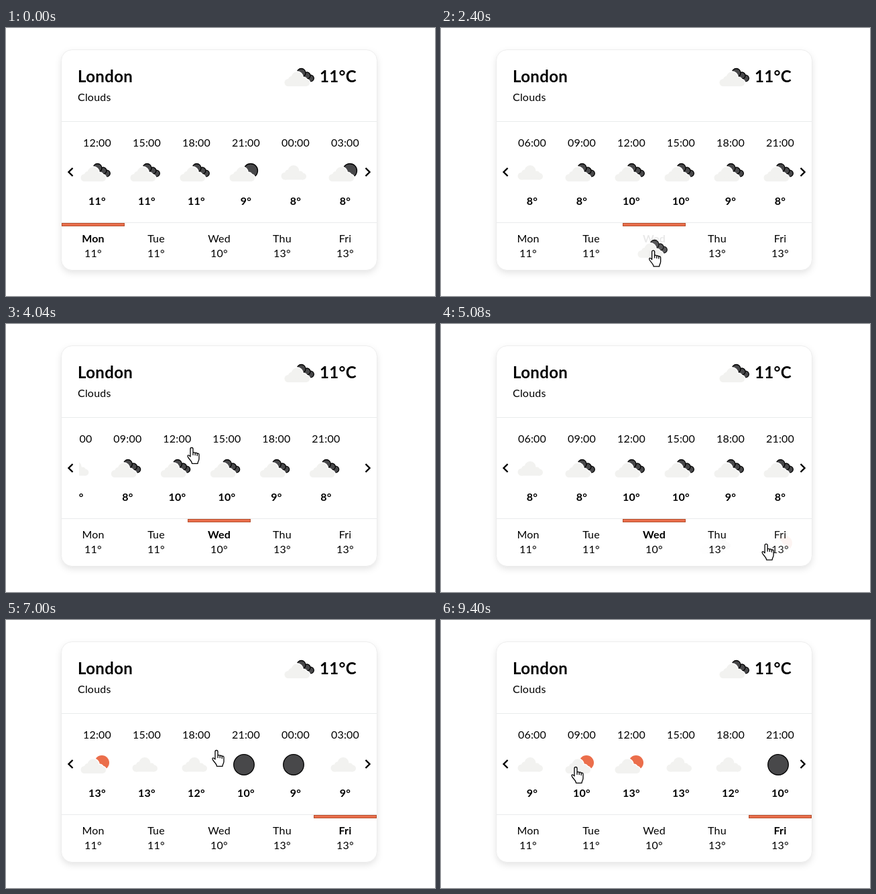
Write an HTML page that moves like this. It is 640 px wide and 400 px high and loops after 9.68 s.

```html
<!DOCTYPE html>
<html lang="en">
<head>
<meta charset="utf-8">
<title>Weather card</title>
<style>
  html, body { margin: 0; height: 100%; overflow: hidden; background: #fff; }
  svg { display: block; width: 640px; height: 400px; }
  text { font: 16px Lato, "Open Sans", sans-serif; letter-spacing: .2px; }
  .mid { text-anchor: middle; }
  .bold { font-weight: 700; }
  .big { font-size: 24px; font-weight: 700; letter-spacing: .35px; }
  .card { fill: #fff; stroke: #ededed; filter: drop-shadow(0 4px 5px rgba(0, 0, 0, .1)); }
  .rule { stroke: #e9ebec; }
  .arrow { fill: none; stroke: #000; stroke-width: 2.4; }
  .dark { fill: #48484a; stroke: #000; stroke-width: 1.3; }
</style>
</head>
<body>
<svg viewBox="0 0 640 400">
  <defs>
    <clipPath id="view"><rect x="109" y="145" width="418" height="140"/></clipPath>
    <clipPath id="inside"><rect x="83" y="33" width="470" height="328" rx="16"/></clipPath>
    <g id="puffs">
      <path d="M-19 6H8V14H-19z"/>
      <circle cx="-19" cy="8.500" r="5.500"/><circle cx="-14" cy="4" r="5"/><circle cx="-6" cy="1" r="8.500"/>
      <circle cx="4" cy="5.500" r="4.500"/><circle cx="8" cy="9" r="5"/>
    </g>
    <g id="front">
      <use href="#puffs" fill="#fff" stroke="#fff" stroke-width="3"/>
      <use href="#puffs" fill="#f2f2f0"/>
    </g>
    <g id="cloud"><use href="#puffs" x="3" y="-2.500" fill="#f2f2f0"/></g>
    <g id="clouds">
      <g class="dark">
        <circle cx="8" cy="3" r="4.500"/><circle cx="14.500" cy="2" r="4.800"/>
        <circle cx="9" cy="-2" r="5"/><circle cx=".5" cy="-6" r="6.500"/>
      </g>
      <use href="#front"/>
    </g>
    <g id="sun"><circle cx="7" cy="-2" r="11" fill="#eb6e4b"/><use href="#front"/></g>
    <g id="night"><circle class="dark" cx="7" cy="-2" r="10.500"/><use href="#front"/></g>
    <g id="moon"><circle class="dark" cx="-3" cy="1" r="15.300"/></g>
  </defs>

  <rect class="card" x="82.5" y="32.5" width="471" height="329" rx="16"/>
  <path class="rule" d="M83 139.500H553M83 290.500H553"/>
  <text class="big" x="107" y="81">London</text>
  <text x="107" y="109">Clouds</text>
  <use href="#clouds" x="440" y="73"/>
  <text class="big" x="468" y="81">11°C</text>
  <path class="arrow" d="M99.500 209L93.500 215L99.500 221M536.500 209L542.500 215L536.500 221"/>

  <g clip-path="url(#view)"><g id="hours"></g></g>
  <g clip-path="url(#inside)">
    <rect id="bar" y="291.500" width="93" height="4" fill="#e96e4c" stroke="#b8512f"/>
  </g>
  <g id="days"></g>
  <path id="hand" fill="#fff" stroke="#000" stroke-width="1.300" stroke-linejoin="round"
    d="M5 14V2.500a2 2 0 0 1 4 0V9c0-2 3.200-2 3.200.3 0-1.700 3-1.500 3 .8 0-1.400 2.800-1.300 2.800 1V17c0 3.500-2 4-2 7.300H7.500C7.500 20.500 1.500 16.500 1 13.400c-.2-2 2-2.400 4 .6zM9 9v3M12.200 9.300v3M15.200 10v3"/>
</svg>
<script>
const LOOP = 9680, STEP = 74, PAGE = 2 * STEP;
const $ = id => document.getElementById(id);

function add(parent, tag, attrs, text = '') {
  const el = document.createElementNS('http://www.w3.org/2000/svg', tag);
  for (const key in attrs) el.setAttribute(key, attrs[key]);
  el.textContent = text;
  return parent.appendChild(el);
}

// first hour, then "icon temperature" for every three hours
const forecasts = [
  [12, 'clouds 11', 'clouds 11', 'clouds 11', 'night 9', 'cloud 8', 'night 8'],
  [6, 'cloud 8', 'clouds 8', 'clouds 10', 'clouds 10', 'clouds 9', 'clouds 8', 'clouds 7', 'cloud 7'],
  [6, 'cloud 9', 'sun 10', 'sun 13', 'cloud 13', 'cloud 12', 'moon 10', 'moon 9', 'cloud 9'],
];
const strips = forecasts.map(([first, ...cells]) => {
  const strip = add($('hours'), 'g');
  cells.forEach((cell, i) => {
    const [icon, temp] = cell.split(' '), x = 136 + i * STEP;
    const hour = String((first + i * 3) % 24).padStart(2, '0');
    add(strip, 'text', { class: 'mid', x, y: 177 }, hour + ':00');
    add(strip, 'use', { href: '#' + icon, x, y: 215 });
    add(strip, 'text', { class: 'mid bold', x, y: 264 }, temp + '°');
  });
  return strip;
});

const days = ['Mon 11 clouds', 'Tue 11 clouds', 'Wed 10 clouds', 'Thu 13 clouds', 'Fri 13 sun'].map((day, i) => {
  const [name, temp, icon] = day.split(' '), x = 130 + i * 94;
  const label = add($('days'), 'g');
  const title = add(label, 'text', { class: 'mid', x, y: 320 }, name);
  add(label, 'text', { class: 'mid', x, y: 342 }, temp + '°');
  return { label, title, icon: add($('days'), 'use', { href: '#' + icon, x, y: 329 }) };
});

// CSS "ease"
function ease(p) {
  if (p <= 0 || p >= 1) return p <= 0 ? 0 : 1;
  let lo = 0, hi = 1, s;
  for (let i = 0; i < 20; i++) {
    s = (lo + hi) / 2;
    if (.75 * s * (1 - s) + s ** 3 < p) lo = s; else hi = s;
  }
  return .3 * s * (1 - s) ** 2 + 3 * s * s * (1 - s) + s ** 3;
}
const ramp = (t, a, b) => ease((t - a) / (b - a));
const pulse = (t, a, b, c, d) => ramp(t, a, b) - ramp(t, c, d);

// start, end, x, y, sideways bend
const moves = [
  [400, 960, 211, 219, -126],
  [1120, 1360, 313, 344, 0],
  [2360, 2600, 270, 184, 0],
  [4600, 5160, 490, 336, 0],
  [6120, 6400, 307, 194, 0],
  [8720, 9240, 195, 219, 0],
  [9360, 9400, 194, 219, 0],
];
function handAt(t) {
  let x = 282, y = 400;
  for (const [a, b, toX, toY, bend] of moves) {
    const p = Math.min(1, Math.max(0, (t - a) / (b - a))), u = p * p * (3 - 2 * p);
    x += (toX - x) * u + 2 * bend * u * (1 - u);
    y += (toY - y) * u;
  }
  return [x, y];
}

function draw(t) {
  const shown = t < 1920 ? 0 : t < 5640 ? 1 : 2;
  strips.forEach((strip, i) => strip.setAttribute('display', i === shown ? 'inline' : 'none'));
  const scroll = pulse(t, 2875, 3135, 3920, 4160) + pulse(t, 6700, 6980, 7760, 8000);
  $('hours').setAttribute('transform', `translate(${-PAGE * scroll})`);
  $('bar').setAttribute('x', 83.5 + 188 * (ramp(t, 1900, 2180) + ramp(t, 5620, 5900)));

  const hover = [0, 0, pulse(t, 1325, 1600, 2380, 2600),
    .3 * pulse(t, 4880, 4980, 4980, 5120), pulse(t, 5060, 5320, 6170, 6400)];
  days.forEach((day, i) => {
    day.icon.setAttribute('opacity', hover[i]);
    day.label.setAttribute('opacity', 1 - hover[i]);
    day.title.classList.toggle('bold', i === shown * 2);
  });

  $('hand').setAttribute('display', t < 400 ? 'none' : 'inline');
  $('hand').setAttribute('transform', `translate(${handAt(t)})`);
}

function tick() {
  draw(performance.now() % LOOP);
  requestAnimationFrame(tick);
}
tick();
</script>
</body>
</html>
```
